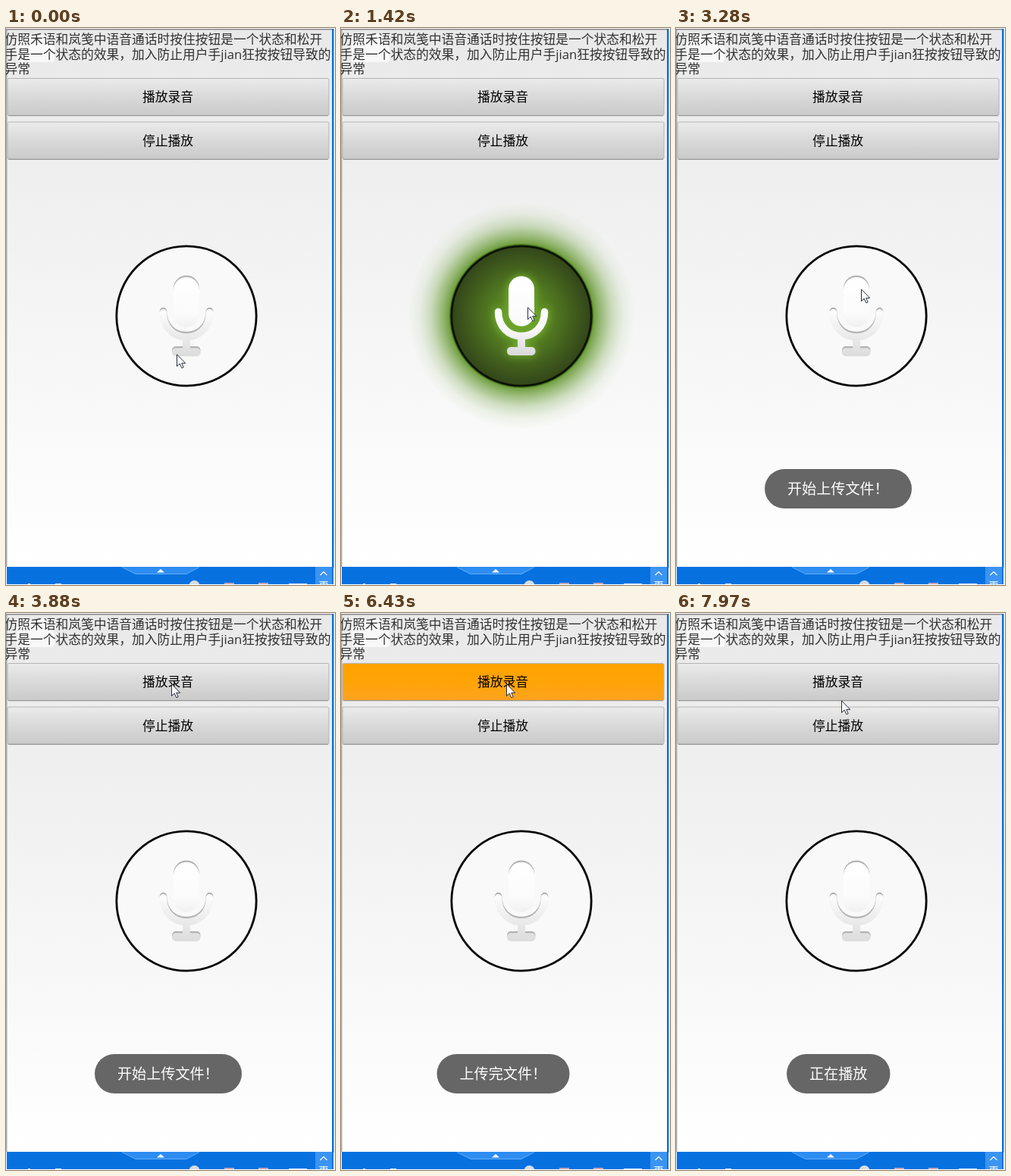
An HTML page for the animation above (8 s loop, 434 by 735 pixels).

```html
<!DOCTYPE html>
<html lang="zh-CN">
<head>
<meta charset="utf-8">
<title>Voice button</title>
<style>
  html, body { margin: 0; width: 100%; height: 100%; overflow: hidden; background: #fff; }
  svg { display: block; width: 100%; height: 100%; }
  text { font-family: "Open Sans", "Noto Sans CJK SC", "Noto Sans CJK", sans-serif; font-size: 16.75px; }
  .note { fill: #303030; }
  .label { text-anchor: middle; fill: #000; }
  .toast rect { fill: #666; }
  .toast text { font-size: 19.1px; fill: #fff; }
</style>
</head>
<body>
<svg viewBox="0 0 434 735">
  <defs>
    <linearGradient id="page" x2="0" y2="1">
      <stop stop-color="#e9e9e9"/><stop offset="1" stop-color="#fff"/>
    </linearGradient>
    <linearGradient id="grey" x2="0" y2="1">
      <stop stop-color="#ebebeb"/><stop offset=".5" stop-color="#d9d9d9"/><stop offset="1" stop-color="#cacaca"/>
    </linearGradient>
    <linearGradient id="orange" x2="0" y2="1">
      <stop stop-color="#ffa200"/><stop offset=".5" stop-color="#ffa406"/><stop offset="1" stop-color="#fca321"/>
    </linearGradient>
    <linearGradient id="pale" gradientUnits="userSpaceOnUse" x1="0" y1="327" x2="0" y2="432">
      <stop stop-color="#fff"/><stop offset=".45" stop-color="#fbfbfb"/><stop offset="1" stop-color="#dcdcdc"/>
    </linearGradient>
    <linearGradient id="bright" gradientUnits="userSpaceOnUse" x1="0" y1="327" x2="0" y2="432">
      <stop stop-color="#fff"/><stop offset=".65" stop-color="#fafafa"/><stop offset="1" stop-color="#d9d9d9"/>
    </linearGradient>
    <radialGradient id="glow" gradientUnits="userSpaceOnUse" cx="238" cy="380" r="150">
      <stop offset=".62" stop-color="#5f9429" stop-opacity=".95"/>
      <stop offset=".7" stop-color="#6a9c38" stop-opacity=".66"/>
      <stop offset=".8" stop-color="#76a548" stop-opacity=".32"/>
      <stop offset=".9" stop-color="#80ad55" stop-opacity=".1"/>
      <stop offset="1" stop-color="#80ad55" stop-opacity="0"/>
    </radialGradient>
    <radialGradient id="disc" gradientUnits="userSpaceOnUse" cx="238" cy="380" r="93">
      <stop stop-color="#64932a"/><stop offset=".4" stop-color="#557f22"/>
      <stop offset=".7" stop-color="#43611d"/><stop offset="1" stop-color="#32441a"/>
    </radialGradient>
    <filter id="halo" x="-40%" y="-40%" width="180%" height="180%">
      <feGaussianBlur stdDeviation="6"/>
    </filter>
    <g id="mic">
      <rect x="221" y="327.500" width="34" height="66" rx="17" stroke="none"/>
      <path d="M207.500 374.500C207.500 394 221 406.500 238 406.500S268.500 394 268.500 374.500" fill="none" stroke-width="9.500" stroke-linecap="round"/>
      <path d="M233 408h10v15h-10z" stroke="none"/>
      <rect x="219" y="421" width="37.500" height="11" rx="5" stroke="none"/>
    </g>
    <clipPath id="bar"><path d="M1 711h431v23H1z"/></clipPath>
  </defs>

  <path fill="#fff" d="M0 0h434v735H0z"/>
  <path fill="url(#page)" d="M1 2h430v709H1z"/>
  <path fill="#aaa" d="M0 2h1.500v709H0z"/>
  <path fill="#8b8389" d="M0 1h431v1.500H0z"/>
  <path fill="#0b6fd8" d="M430 1h2.500v711H430z"/>

  <rect x="14" y="8" width="50" height="37" rx="4" fill="#fff" opacity=".7"/>
  <text class="note" x="-1.500" y="20.800">仿照禾语和岚笺中语音通话时按住按钮是一个状态和松开</text>
  <text class="note" x="-1.500" y="40.500">手是一个状态的效果，加入防止用户手jian狂按按钮导致的</text>
  <text class="note" x="-1.500" y="60.200">异常</text>

  <g stroke="#b4b4b4">
    <rect id="play" x="2" y="66.500" width="424" height="49" rx="2"/>
    <rect x="2" y="124" width="424" height="49" rx="2" fill="url(#grey)"/>
    <path d="M3 115.700h422M3 173.300h422" stroke="#8e8e8e"/>
  </g>
  <text class="label" x="213.500" y="97.300">播放录音</text>
  <text class="label" x="213.500" y="154.800">停止播放</text>

  <g id="idle">
    <circle cx="238" cy="380" r="92.200" fill="#f9f9f9" stroke="#050505" stroke-width="2.800"/>
    <use href="#mic" y="-1" fill="#b2b2b2" stroke="#b2b2b2"/>
    <use href="#mic" y="1.200" fill="url(#pale)" stroke="url(#pale)"/>
  </g>
  <g id="active">
    <circle cx="238" cy="380" r="150" fill="url(#glow)"/>
    <circle cx="238" cy="380" r="95" fill="#47751c"/>
    <circle cx="238" cy="380" r="92.200" fill="url(#disc)" stroke="#0b1204" stroke-width="2.800"/>
    <use href="#mic" fill="#83c932" stroke="#83c932" filter="url(#halo)" opacity=".85"/>
    <use href="#mic" fill="url(#bright)" stroke="url(#bright)"/>
  </g>

  <g id="toasts"></g>

  <g clip-path="url(#bar)">
    <path fill="#0671df" d="M1 711h431v23H1z"/>
    <path fill="#2d8df2" d="M153 711h102l-17 9.500h-67z"/>
    <path fill="none" stroke="#62aef8" d="M153 711.500l18 9h67l17-9"/>
    <path fill="#fff" d="M199 718.500l5-4.500 5 4.500z"/>
    <path fill="#3b94f1" d="M408 711h22v24h-22z"/>
    <path fill="none" stroke="#fff" stroke-width="1.200" d="M414.500 722l4.500-4.500 4.500 4.500"/>
    <text x="412.500" y="739.500" fill="#fff" style="font-size:13px">更</text>
    <circle cx="248.500" cy="736" r="7" fill="#d5dce6"/>
    <path fill="#c4a5b5" d="M288 732h13v3h-13zM333 732h13v3h-13z"/>
    <path fill="#dcecff" d="M373 733h24v2h-24zM29 733h3v2h-3zM65 733h8v2h-8z"/>
  </g>
  <path id="cursor" fill="#fff" stroke="#252b3d" d="M.5.8V16.500L4.200 13l2.600 5.700 2.400-1-2.500-5.400h5z"/>
</svg>
<script>
const LOOP = 8000;
const $ = id => document.getElementById(id);

const toasts = [
  { text: '开始上传文件！', x: 117, width: 194 },
  { text: '上传完文件！', x: 126.500, width: 175 },
  { text: '正在播放', x: 146, width: 136.500 }
].map(({ text, x, width }) => {
  $('toasts').insertAdjacentHTML('beforeend',
    `<g class="toast"><rect x="${x}" y="582" width="${width}" height="52" rx="26"/>` +
    `<text x="${x + 30}" y="615.300">${text}</text></g>`);
  return $('toasts').lastElementChild;
});

// Progress in equal jumps; the first happens at start, the last at end.
function steps(t, start, end, count) {
  if (t < start) return 0;
  if (t >= end) return 1;
  return (Math.floor((t - start) / (end - start) * (count - 1)) + 1) / count;
}

const mix = (a, b, p) => a + (b - a) * p;
const ease = p => p * p * (3 - 2 * p);
const bezier = (a, b, c, d, p) => {
  const q = 1 - p;
  return a * q ** 3 + 3 * b * q * q * p + 3 * c * q * p * p + d * p ** 3;
};

function cursorAt(t) {
  if (t < 3170) {
    const p = steps(t, 70, 870, 12);
    return [bezier(225, 360, 300, 246, p), bezier(430, 260, 150, 368, p)];
  }
  const up = ease(steps(t, 3170, 3880, 11));
  const down = steps(t, 7820, 7970, 3);
  return [mix(246, 218, up), mix(368, 93, up) + 22 * down];
}

function draw(t) {
  const pressed = t >= 1420 && t < 2730;
  $('active').style.display = pressed ? '' : 'none';
  $('idle').style.display = pressed ? 'none' : '';
  $('play').setAttribute('fill', t >= 6430 && t < 6510 ? 'url(#orange)' : 'url(#grey)');

  const second = steps(t, 4740, 5120, 6);
  const third = steps(t, 6660, 7060, 6);
  [t >= 2810 ? 1 - second : 0, second * (1 - third), third]
    .forEach((opacity, i) => toasts[i].setAttribute('opacity', opacity));

  const [x, y] = cursorAt(t).map(Math.round);
  $('cursor').setAttribute('transform', `translate(${x} ${y})`);
}

const start = performance.now();
function tick() {
  draw((performance.now() - start) % LOOP);
  requestAnimationFrame(tick);
}
tick();
</script>
</body>
</html>
```
